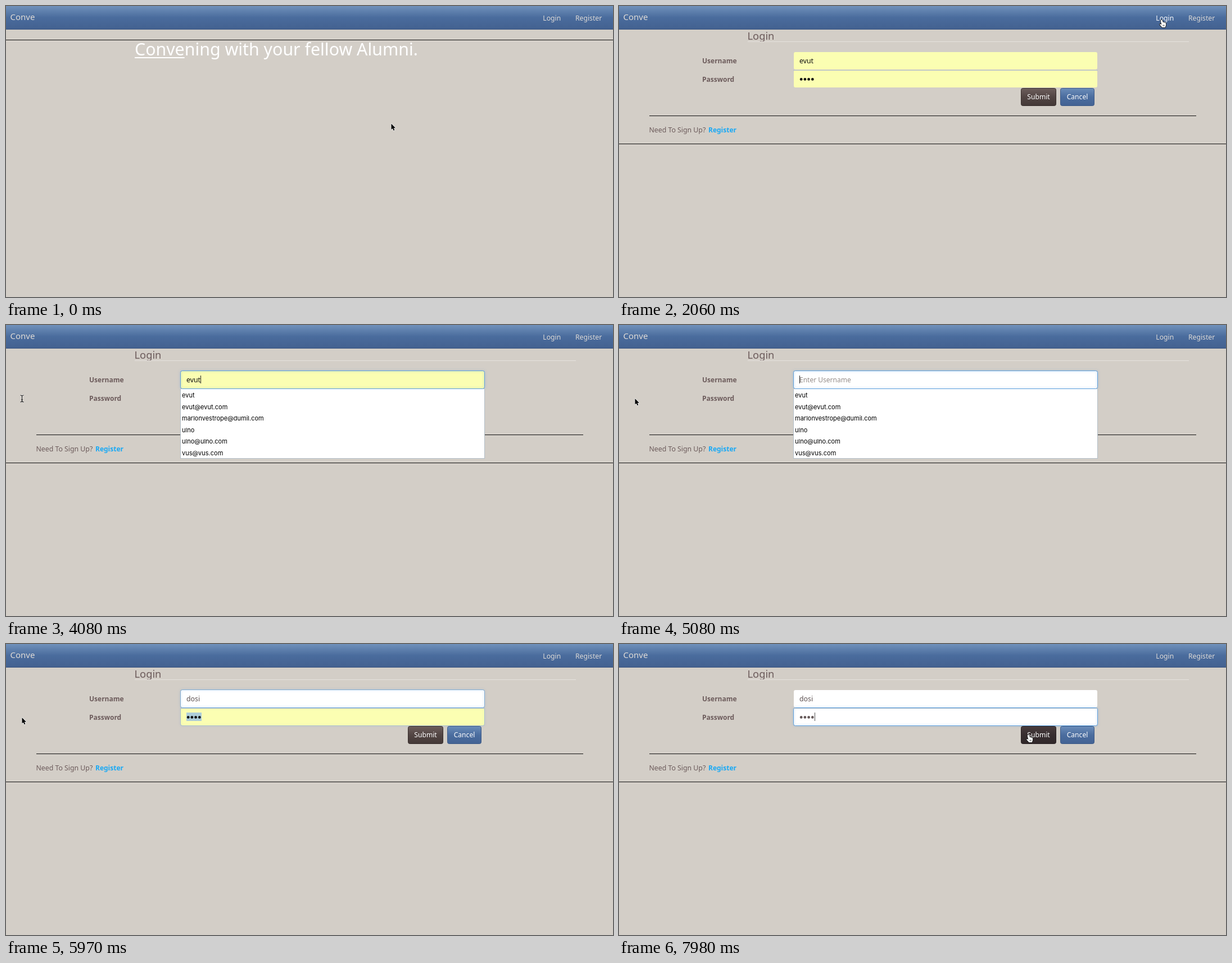
Animation of 1080 by 518 pixels, one loop 8000 ms. Source, as an HTML page with a canvas:

```html
<!DOCTYPE html>
<html lang="en">
<head>
<meta charset="utf-8">
<title>Alumni login</title>
<style>
  html, body { margin: 0; width: 100%; height: 100%; overflow: hidden; background: #d3cec7; }
  canvas { display: block; }
</style>
</head>
<body>
<canvas id="stage" width="1080" height="518"></canvas>
<script>
const ctx = document.getElementById('stage').getContext('2d');
const LOOP = 8000;
const REFRESH = 115;
const SANS = '"Noto Sans", "Open Sans", sans-serif';
const MENU = 'Inter, Roboto, sans-serif';
const BROWN = '#6c5b5b', NAV_TEXT = '#e0dcd7', YELLOW = '#fbfeb2', BLUE = '#5e9fdd';
const BRAND = 'Conve', OLD_USER = 'evut', NEW_USER = 'dosi';
const ENTRIES = ['evut', 'evut@evut.com', 'marlonvestrope@dumil.com',
                 'ulno', 'ulno@ulno.com', 'vus@vus.com'];

// Key moments in ms
const HOVER = 1330, PAGE = 2060, FOCUS = 3730, ERASE = 4580, EMPTY = 5080,
      TYPE = 5500, TAB = 5970, SECRET = 6210, PRESS = 7900;

// Pointer moves: first and last refresh in ms, then where the move ends
const START = [685.5, 209.5];
const MOVES = [
  [390, 390, 690, 210], [570, 1010, 931.5, 62.5], [HOVER - 200, HOVER, 963, 30],
  [1440, 1560, 966, 25], [2600, 2600, 932, 38.5], [2750, 2980, 726, 87],
  [3100, 3190, 720, 91.5], [FOCUS, 4080, 28.5, 131],
  [6980, 7440, 400, 190], [7550, 7780, 690.5, 168], [PRESS, 7980, 729, 162]
];

const clamp = v => Math.max(0, Math.min(1, v));

// Progress in equal jumps; the first jump happens at a, the last at b.
function stepped(t, a, b) {
  if (t < a) return 0;
  const jumps = Math.round((b - a) / REFRESH);
  if (!jumps || t >= b) return 1;
  return (Math.floor((t - a) / (b - a) * jumps + 0.01) + 1) / (jumps + 1);
}

function pointerAt(t) {
  let [x, y] = START;
  for (const [a, b, toX, toY] of MOVES) {
    const u = Math.sin(stepped(t, a, b) * Math.PI / 2);
    x += (toX - x) * u;
    y += (toY - y) * u;
  }
  return [x, y];
}

function text(str, x, y, size, color, weight = 400, family = SANS) {
  ctx.font = `${weight} ${size}px ${family}`;
  ctx.fillStyle = color;
  ctx.fillText(str, x, y);
  return ctx.measureText(str).width;
}

function rect(x, y, w, h, color) {
  ctx.fillStyle = color;
  ctx.fillRect(x, y, w, h);
}

function box(x, y, w, h) {
  ctx.beginPath();
  ctx.roundRect(x, y, w, h, 3);
}

function shade(y0, y1, ...colors) {
  const g = ctx.createLinearGradient(0, y0, 0, y1);
  colors.forEach((c, i) => g.addColorStop(i / (colors.length - 1), c));
  return g;
}

function navBar(active) {
  rect(0, 0, 1080, 42, shade(0, 41, '#7091bb', '#4a6c9d', '#436190'));
  rect(0, 41, 1080, 1, '#3c5680');
  text(BRAND, 7.5, 25, 15, NAV_TEXT, 500);
  text('Login', 955.3, 25.5, 12.2, active ? '#fff' : NAV_TEXT, 500);
  text('Register', 1013, 25.5, 12.2, NAV_TEXT, 500);
}

function home() {
  rect(0, 60, 1080, 1, '#111');
  const w = text(BRAND, 229, 88, 30.3, '#fff');
  text('ning with your fellow Alumni.', 229 + w, 88, 30.3, '#fff');
  rect(229, 91, w, 2, '#fff');
}

function field(y, color, glow) {
  box(311, y, 540, 31);
  ctx.fillStyle = color;
  ctx.fill();
  if (!glow) return;
  ctx.save();
  ctx.globalAlpha = glow;
  ctx.strokeStyle = BLUE;
  ctx.shadowColor = 'rgba(94,159,221,.7)';
  ctx.shadowBlur = 4;
  box(310.5, y - 0.5, 541, 32);
  ctx.stroke();
  ctx.restore();
}

function button(label, x, w, border, ...colors) {
  box(x + 0.5, 146.5, w - 1, 31);
  ctx.fillStyle = shade(146, 178, ...colors);
  ctx.fill();
  ctx.strokeStyle = border;
  ctx.stroke();
  ctx.textAlign = 'center';
  text(label, x + w / 2, 166, 12.1, '#fff', 500);
  ctx.textAlign = 'left';
}

function dots(n, color) {
  ctx.fillStyle = color;
  for (let i = 0; i < n; i++) {
    ctx.beginPath();
    ctx.arc(324.2 + i * 6.7, 130.4, 2.4, 0, 7);
    ctx.fill();
  }
}

function menu(rows) {
  const h = 20.5 * rows + 1;
  rect(310, 114, 542, h, '#b3bfc9');
  rect(311, 114, 540, h - 1, '#fff');
  ENTRIES.slice(0, rows).forEach((s, i) => text(s, 313, 129.3 + i * 20.5, 11, '#000', 400, MENU));
}

function userName(t) {
  const keys = (from, gap) => Math.min(4, Math.floor((t - from) / gap) + 1);
  if (t < ERASE) return OLD_USER;
  if (t < TYPE) return OLD_USER.slice(0, 4 - keys(ERASE, 110));
  return NEW_USER.slice(0, keys(TYPE, 117));
}

function menuRows(t) {
  if (t < FOCUS || t >= TYPE) return 0;
  return t >= ERASE && t < EMPTY ? 2 : 6;
}

function login(t) {
  const name = userName(t);
  const swap = stepped(t, TAB, SECRET);
  const filled = t < ERASE, stored = t < SECRET;

  text('Login', 228.5, 60, 18.3, BROWN, 500);
  rect(229, 63, 785, 1, '#e6e2de');
  text('Username', 148, 102.3, 12, BROWN, 600);
  text('Password', 148, 134.8, 12, BROWN, 600);
  field(82, filled ? YELLOW : '#fff', t < TAB ? stepped(t, FOCUS, FOCUS + 230) : 1 - swap);
  field(114, stored ? YELLOW : '#fff', swap);

  const w = name ? text(name, 321, 101.5, 12.3, filled ? '#111' : '#5d5151') : 0;
  if (!name) text('Enter Username', 321, 101.5, 12, '#958d8a');
  if (t >= FOCUS && t < TAB) rect(321 + Math.round(w), 90, 1, 14, '#222');

  if (t >= TAB && stored) rect(321, 122, 27, 15, '#aecdd9');
  const count = stored ? 4 : Math.min(4, Math.floor((t - SECRET) / 120) + 1 - (t > 6570 && t < 6690));
  dots(count, stored ? '#111' : '#655959');
  if (!stored) rect(Math.round(321 + count * 6.7), 122, 1, 15, '#555');

  if (t >= PRESS) button('Submit', 715, 63, '#2a2224', '#493d3e', '#382e30', '#302729');
  else button('Submit', 715, 63, '#382e2c', '#6e5f5d', '#524543', '#433836');
  button('Cancel', 785, 61, '#3d5a87', '#6c8eba', '#4b6d9f', '#436293');

  rect(54, 195, 973, 1, '#111');
  text('Need To Sign Up?', 53.5, 225, 12.3, BROWN);
  text('Register', 159, 225, 12, '#19a9f5', 600);
  rect(0, 245, 1080, 1, '#111');
  menu(menuRows(t));
}

function outline(d, fill, line, width) {
  const p = new Path2D(d);
  ctx.lineJoin = 'round';
  ctx.strokeStyle = line;
  ctx.lineWidth = width;
  ctx.stroke(p);
  ctx.fillStyle = fill;
  ctx.fill(p);
}

const SHAPES = {
  arrow() {
    const d = 'M0 0V10.6L2.4 8.4L4.1 12.3L5.9 11.5L4.2 7.7H7.6Z';
    outline(d, '#fff', 'rgba(255,255,255,.85)', 1.5);
    outline(d, '#000', 'transparent', 1);
  },
  beam() {
    const d = 'M-3 -6Q0 -6 0 -4Q0 -6 3 -6M0 -4V4M-3 6Q0 6 0 4Q0 6 3 6M-1.5 2H1.5';
    outline(d, 'transparent', 'rgba(255,255,255,.6)', 2.4);
    outline(d, 'transparent', '#111', 1.1);
  },
  hand() {
    outline('M-1.8 0Q-.6 -1.2 .5 .3L2 4.2Q3.2 3.4 4 4.5Q5.1 3.9 5.7 5Q7 4.8 7.2 6.2' +
      'L7 9.5L5.8 13H.4L-3.6 8.6Q-4.3 7 -2.8 6.9L-.6 8L-2.4 1.5Z', '#fff', '#111', 1.6);
    outline('M2.2 8.5V11M4 8.5V11', 'transparent', '#111', 0.7);
  }
};

function pointer(t) {
  const hand = t >= HOVER && t < 2600 || t >= PRESS;
  const beam = t >= 2980 && t < ERASE;
  ctx.save();
  ctx.translate(...pointerAt(t));
  SHAPES[hand ? 'hand' : beam ? 'beam' : 'arrow']();
  ctx.restore();
}

function draw(t) {
  ctx.lineWidth = 1;
  rect(0, 0, 1080, 518, '#d3cec7');
  navBar(t >= HOVER && t < FOCUS);
  if (t < PAGE) home();
  else login(t);
  pointer(t);
}

let start;
function loop(now) {
  start ??= now;
  draw((now - start) % LOOP);
  requestAnimationFrame(loop);
}
requestAnimationFrame(loop);
</script>
</body>
</html>
```
